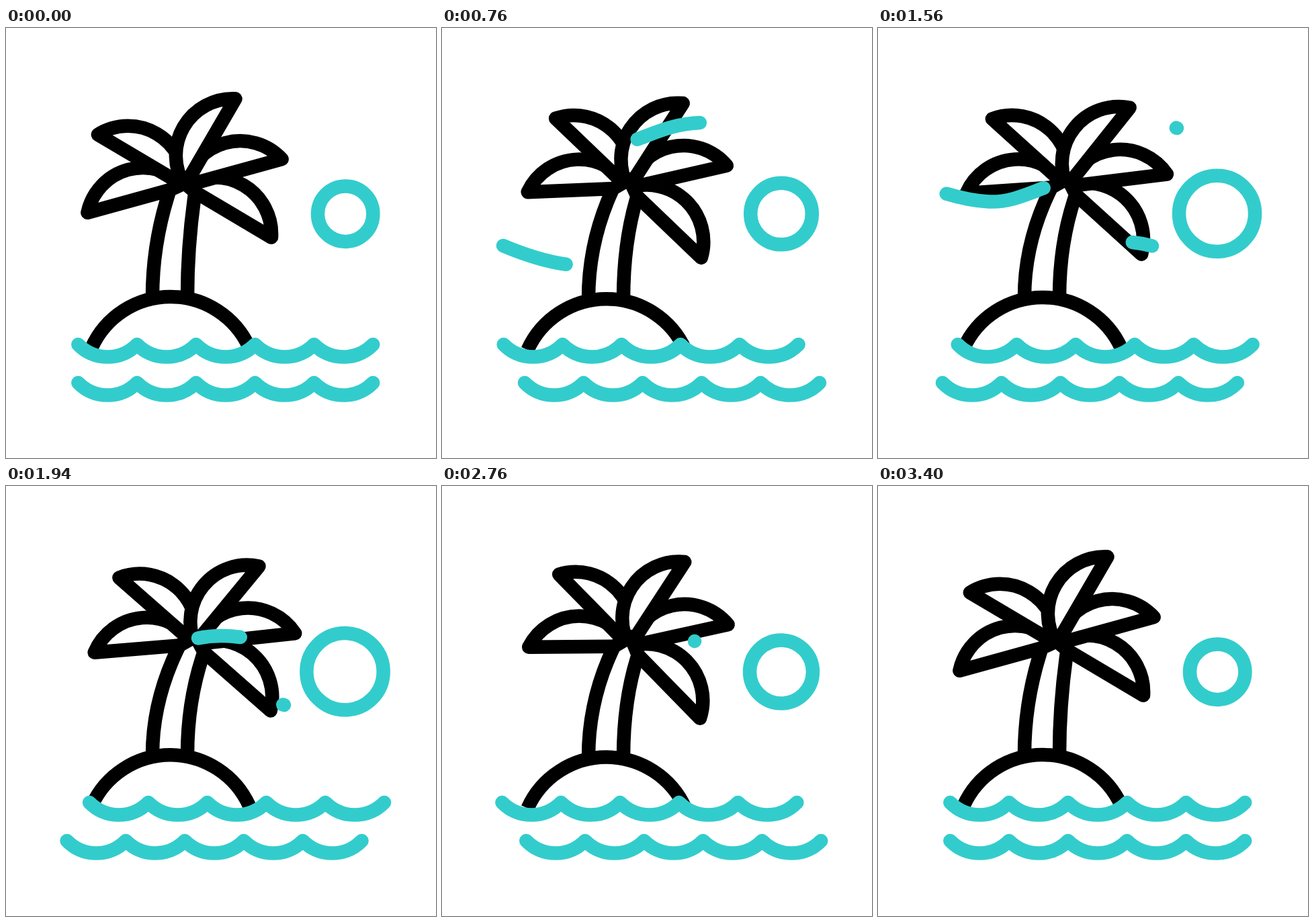
An HTML page that plays this animation: 640x640 px, repeating every 3.62 s.

```html
<!DOCTYPE html>
<html>
<head>
<meta charset="utf-8">
<style>
  html, body { margin: 0; width: 100%; height: 100%; overflow: hidden; background: #fff; }
  svg { display: block; width: 100%; height: 100%; }
  path, circle { fill: none; stroke-width: 20.5; stroke-linecap: round; stroke-linejoin: round; }
  .black { stroke: #000; }
  .teal { stroke: #3cc; }
  .filled { fill: #fff; }
  .land { stroke-linecap: butt; }
</style>
</head>
<body>
<svg viewBox="0 0 640 640"></svg>
<script>
const svg = document.querySelector('svg');

function add(tag, cls, attrs = {}) {
  const el = document.createElementNS('http://www.w3.org/2000/svg', tag);
  el.setAttribute('class', cls);
  set(el, attrs);
  return svg.appendChild(el);
}
function set(el, attrs) {
  for (const k in attrs) el.setAttribute(k, attrs[k]);
}

const SWAY_RIGHT = [3.3, 9.8], SWAY_LEFT = [16.7, 10.1];
// angle in degrees, arc direction, sway at the quarter and half of the cycle
const leaves = [
  [164.6, 1, SWAY_LEFT],
  [30.7, 0, SWAY_LEFT],
  [-15.4, 0, SWAY_RIGHT],
  [210.6, 1, SWAY_LEFT],
  [-59.8, 0, SWAY_RIGHT]
].map(([angle, sweep, sway]) => ({ angle, sweep, sway, el: add('path', 'black filled') }));
const trunk = add('path', 'black filled');
const island = add('path', 'black land', { d: 'M127.4 476A128.7 128.7 0 0 1 362.2 476' });
const sun = add('circle', 'teal');
const waves = [471, 528].map(y =>
  add('path', 'teal', { d: `M107.3 ${y}` + 'a61.3 61.3 0 0 0 87.8 0'.repeat(5) }));
// start point and first step of each gust
const gusts = [[122, 147, 0.5], [91, 324, 21], [53, 229, 51]].map(([x, y, from]) => ({
  from,
  el: add('path', 'teal', {
    d: `M${x} ${y}c38 16 78 28 112 29.5c53 2.5 88-35.5 156-35.5c20 0 38 3 55 8`,
    pathLength: 1
  })
}));

const clamp = x => Math.min(1, Math.max(0, x));
const smooth = x => x * x * (3 - 2 * x);
const easeOut = x => 1 - (1 - clamp(x)) ** 3;

// Eased values spread evenly over the 160 steps
function key(n, ...vals) {
  const p = n / 160 * (vals.length - 1);
  const i = Math.min(Math.floor(p), vals.length - 2);
  return vals[i] + (vals[i + 1] - vals[i]) * smooth(p - i);
}

function draw(n) {
  const bob = key(n, 0, 4, 0, 4, 0);
  const lean = key(n, 0, 14.7, 15.2, 14.7, 0);
  const ox = 266 + lean, oy = 235 + bob;
  const sway = ([a, b]) => key(n, 0, a, b, a, 0);
  const polar = (deg, r) => {
    const a = deg * Math.PI / 180;
    return `${ox + r * Math.cos(a)} ${oy + r * Math.sin(a)}`;
  };

  for (const { angle, sweep, sway: s, el } of leaves)
    set(el, { d: `M${ox} ${oy}L${polar(angle + sway(s), 150)}A84.5 84.5 0 0 ${sweep} ${ox} ${oy}Z` });

  const turn = sway(SWAY_LEFT), bend = 0.25 * lean, base = 400 + bob;
  set(trunk, {
    d: `M218 ${base}C218 347 ${227 + bend} 292 ${polar(164.6 + turn, 23)}` +
       `L${ox + 0.1 * turn} ${oy - 4 - 0.7 * turn}L${polar(30.7 + turn, 18)}` +
       `C${274 + bend} 296 270 348 270 ${base}`
  });
  set(island, { transform: `translate(0 ${bob})` });

  const grow = key(n, 0, 1, 0);
  set(sun, { cx: 505.2 - 0.7 * grow, cy: 276.7 - 0.5 * grow, r: 41.2 + 16.3 * grow });

  const drift = key(n, 0, -20, 20, -20, 0);
  waves.forEach((el, i) => set(el, { transform: `translate(${i ? -drift : drift} 0)` }));

  for (const { from, el } of gusts) {
    const head = easeOut((n - from) / 64), tail = easeOut((n - from - 13.5) / 64);
    set(el, {
      visibility: head > 0 && tail < 1 ? 'visible' : 'hidden',
      'stroke-dasharray': `${head - tail} 2`,
      'stroke-dashoffset': -tail
    });
  }
}

const begin = performance.now();
function tick() {
  const t = (performance.now() - begin) % 3620;
  draw(Math.min(160, Math.max(0, Math.floor((t - 200) / 20))));
  requestAnimationFrame(tick);
}
tick();
</script>
</body>
</html>
```
